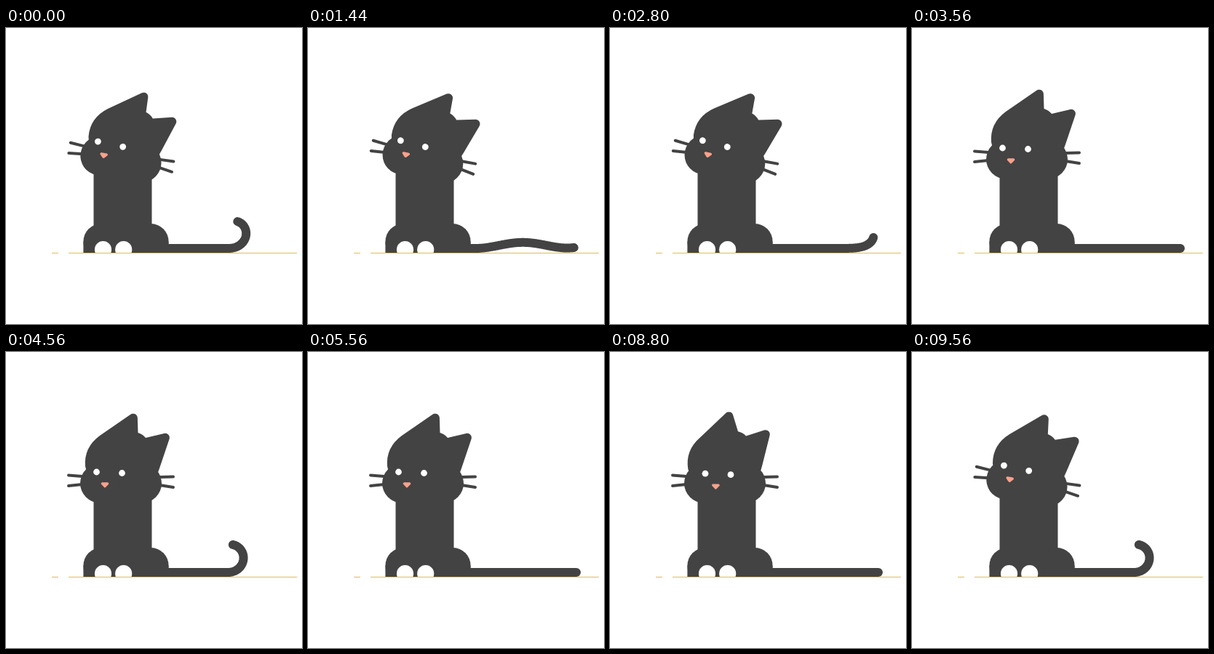
These frames come from a looping animation (407x407 px, 9.6 s). An HTML page with a canvas:

```html
<!DOCTYPE html>
<html lang="en">
<head>
<meta charset="utf-8">
<title>Cat</title>
<style>
  html, body { margin: 0; width: 100%; height: 100%; overflow: hidden; background: #fff; }
  canvas { display: block; width: 407px; height: 407px; }
</style>
</head>
<body>
<canvas id="stage"></canvas>
<script>
const LOOP = 9600, STEP = 80, BLINK = 120;
const FUR = '#434343', LID = '#2c2c2c', PINK = '#faa18c', GOLD = '#dfbf58';
const RAD = Math.PI / 180;

// Head pose: face tilt, ear tilt (degrees), look x, look y
const REST = [9.5, 9.5, -1, -3.6];
const HEAD_MOVES = [
  [1120, 1200, [12, 12, -1, -3.6]],
  [2960, 3200, [0, 0, 0, 0]],
  [6720, 6960, [0, -4.5, 6.5, 2.2]],
  [9240, 9560, [9.5, 4.5, -1, -3.6]]
];

// start, end, curl reached, lift on the way (no lift: the tail ripples)
const TAIL_MOVES = [
  [480, 640, 0, 1.6],
  [1440, 1920, 1, 0],
  [2080, 2240, .95, 1.1],
  [2560, 2800, .2, 1],
  [2960, 3200, 0, 0],
  [4320, 4560, 1, 1],
  [4720, 5240, 0, 1],
  [6040, 6280, 1, 1],
  [8000, 8240, 0, 1],
  [9240, 9560, 1, 1]
];

// start, end, swing of the left ear in degrees
const TWITCHES = [[1520, 1920, -8], [4720, 5240, -5], [8800, 8960, -4]];
const BLINKS = [800, 3440, 5440, 7600];

const canvas = document.getElementById('stage');
const ctx = canvas.getContext('2d');
const dpr = window.devicePixelRatio || 1;
canvas.width = canvas.height = 407 * dpr;
ctx.scale(dpr, dpr);
ctx.lineCap = ctx.lineJoin = 'round';

const mix = (a, b, p) => a + (b - a) * p;
const ease = p => p < .5 ? 16 * p ** 5 : 1 - (2 - 2 * p) ** 5 / 2;

// Progress from 0 to 1, held between steps
function progress(t, start, end) {
  if (t < start) return 0;
  if (t >= end) return 1;
  const n = Math.floor((end - start) / STEP);
  return (Math.floor((t - start) / (end - start) * n) + 1) / (n + 1);
}

function headPose(t) {
  return HEAD_MOVES.reduce((pose, [start, end, to]) => {
    const p = progress(t, start, end);
    return pose.map((v, i) => mix(v, to[i], p));
  }, REST);
}

function tailPose(t) {
  const pose = { curl: .95, lift: 0, ripple: 0 };
  for (const [start, end, to, lift] of TAIL_MOVES) {
    const p = progress(t, start, end);
    if (!p) break;
    pose.curl = mix(pose.curl, to, ease(p));
    pose.lift = lift * Math.sin(Math.PI * p);
    pose.ripple = lift ? 0 : .2 * Math.cos(Math.PI / 2 * p);
  }
  return pose;
}

function line(color, width, draw) {
  ctx.beginPath();
  draw();
  ctx.strokeStyle = color;
  ctx.lineWidth = width;
  ctx.stroke();
}

function shape(color, draw) {
  ctx.beginPath();
  draw();
  ctx.fillStyle = color;
  ctx.fill();
}

const disc = (color, x, y, r) => shape(color, () => ctx.arc(x, y, r, 0, 7));

function turned(x, y, degrees, draw) {
  ctx.save();
  ctx.translate(x, y);
  ctx.rotate(degrees * RAD);
  draw();
  ctx.restore();
}

function drawGround() {
  ctx.fillStyle = GOLD;
  ctx.fillRect(63, 309, 9, 1);
  ctx.fillRect(86, 309, 314, 1);
}

// The tail is a chain whose heading depends on the distance from its root
function drawTail({ curl, lift, ripple }) {
  const bend = 85, length = 149 - 6 * curl - 12 * ripple;
  const turn = 2.95 * Math.sqrt(curl), sharpness = 1.1 + 3.6 * (1 - curl);
  line(FUR, 12, () => {
    let x = 220, y = 303;
    ctx.moveTo(212, y);
    for (let s = .5; s < length; s++) {
      let a = lift * Math.min(1, s / 22);
      if (s > bend) a += turn * ((s - bend) / (length - bend)) ** sharpness;
      if (s > 10 && s < 142) a += ripple * Math.sin((s - 10) / 66 * Math.PI);
      x += Math.cos(a);
      y -= Math.sin(a);
      ctx.lineTo(x, y);
    }
  });
}

function drawBody() {
  ctx.save();
  ctx.beginPath();
  ctx.rect(100, 150, 130, 159);
  ctx.clip();
  shape(FUR, () => ctx.rect(120.5, 170, 80, 139));
  for (const x of [131, 199]) {
    disc(FUR, x, 293.7, 24.6);
    shape(FUR, () => ctx.rect(x - 24.6, 293.7, 49.2, 16));
  }
  for (const x of [133.5, 161.7]) disc('#fff', x, 304.7, 11.6);
  ctx.restore();
}

// Skull and ears, around the middle of the head
function drawEars(swing) {
  const c = Math.cos(swing * RAD), s = Math.sin(swing * RAD);
  const tipX = 22.5, tipY = -100.5;
  shape(FUR, () => {
    ctx.moveTo(-40, 15);
    ctx.lineTo(-49, -23);
    ctx.quadraticCurveTo(-51, -49, -29, -65);
    ctx.arcTo(tipX * c - tipY * s, tipX * s + tipY * c, 23.5, -69, 6);
    ctx.lineTo(23.5, -69);
    ctx.quadraticCurveTo(30, -67, 34, -62);
    ctx.arcTo(70, -70.5, 53, -20, 6);
    ctx.lineTo(53, -20);
    ctx.lineTo(40, 15);
  });
}

function drawCheeks() {
  for (const side of [-1, 1]) {
    disc(FUR, side * 29, .5, 27);
    for (const low of [0, 1]) {
      const y = mix(-9.5, 5, low);
      line(FUR, 4, () => {
        ctx.moveTo(side * 72, y + side);
        ctx.lineTo(side * 53, mix(-8.5, 2.5, low) + side / 2);
      });
    }
  }
}

function drawFace(lookX, closed) {
  for (const [x, y] of [[-33.5, -15], [1.5, -13.5]]) {
    if (closed) line(LID, 4, () => ctx.arc(x, y + .5, 5.7, 0, Math.PI));
    else disc('#fff', x, y, 4.4);
  }
  const x = lookX * .45 - 22, y = 2.7;
  const nose = () => {
    ctx.moveTo(x - 3.6, y - 1.8);
    ctx.lineTo(x + 3.6, y - 1.8);
    ctx.lineTo(x, y + 2);
    ctx.closePath();
  };
  shape(PINK, nose);
  line(PINK, 3.4, nose);
}

function draw(now) {
  const t = now % LOOP;
  const [tilt, earTilt, lookX, lookY] = headPose(t);
  const swing = TWITCHES.reduce((sum, [start, end, deg]) =>
    sum + deg * Math.sin(Math.PI * progress(t, start, end)), 0);
  const closed = BLINKS.some(start => t >= start && t < start + BLINK);

  ctx.fillStyle = '#fff';
  ctx.fillRect(0, 0, 407, 407);
  drawGround();
  drawTail(tailPose(t));
  drawBody();
  turned(158, 180, earTilt, () => drawEars(swing));
  turned(158, 180, tilt, drawCheeks);
  turned(158 + lookX, 180 + lookY, tilt, () => drawFace(lookX, closed));
  requestAnimationFrame(draw);
}

draw(performance.now());
</script>
</body>
</html>
```
